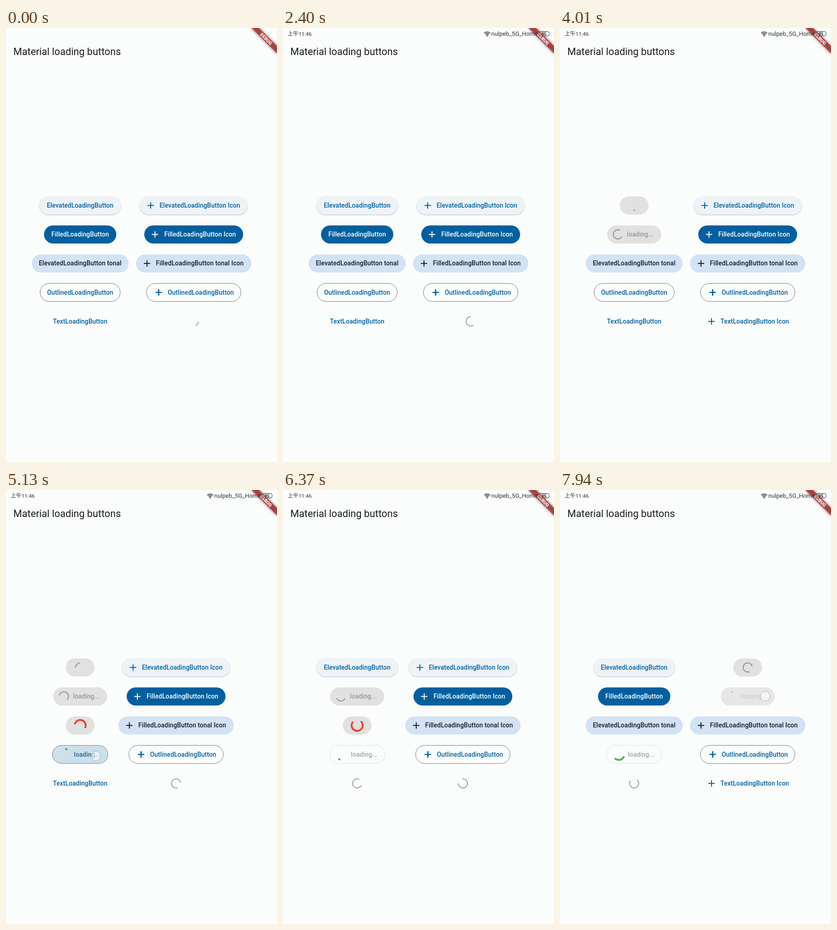
Recreate the animation shown at these times as an HTML page. Size 592x947 px, loop 7990 ms.

```html
<!DOCTYPE html>
<html lang="en">
<head>
<meta charset="utf-8">
<title>Material loading buttons</title>
<style>
  html, body { margin: 0; width: 100%; height: 100%; overflow: hidden; background: #fbfdfc; }
  svg { display: block; width: 592px; height: 947px; font-family: Roboto, sans-serif; }
  .label { font-size: 13.83px; font-weight: 500; letter-spacing: .1px; text-anchor: middle; }
  .raised { filter: drop-shadow(0 1px 1px rgba(0, 0, 0, .26)); }
</style>
</head>
<body>
<svg viewBox="0 0 592 947">
  <rect width="592" height="947" fill="#fbfdfc"/>
  <text x="16" y="59" font-size="21.72" fill="#1a1c1e">Material loading buttons</text>
  <g id="buttons"></g>
  <g transform="translate(592 0) rotate(45) scale(.9875)">
    <rect x="-40" y="28" width="80" height="12" fill="#000" opacity=".5" style="filter:blur(3px)"/>
    <rect x="-40" y="28" width="80" height="12" fill="#b71c1c" fill-opacity=".66"/>
    <text y="37.6" font-size="10.2" font-weight="900" fill="#fff" text-anchor="middle">DEBUG</text>
  </g>
  <g id="status" fill="#333">
    <text x="10" y="17.4" font-size="12" font-family="'Noto Sans CJK SC', 'Noto Sans CJK', sans-serif">上午<tspan
      font-family="Roboto, sans-serif" font-size="11.6">11:46</tspan></text>
    <g fill="none" stroke="#333" stroke-width="1.4">
      <path d="M439.3 11.2a9.5 9.5 0 0 1 13.4 0M441.4 13.4a6.5 6.5 0 0 1 9.2 0M443.6 15.5a3.4 3.4 0 0 1 4.8 0"/>
      <rect x="559.5" y="7.5" width="22" height="10" rx="4" stroke-width="1"/>
    </g>
    <circle cx="446" cy="17.2" r="1.2"/>
    <text x="455" y="17.2" font-size="13">nulpeb_5G_Home</text>
    <text x="570.3" y="15.8" font-size="9" font-weight="700" text-anchor="middle">95</text>
  </g>
  <g id="pointers"></g>
</svg>
<script>
const LOOP = 7990, LOAD = 3000, FADE = 200, HEIGHT = 39.5;
const BLUE = [0, 97, 160, 1], WHITE = [255, 255, 255, 1], INK = [16, 28, 43, 1];
const BORDER = [115, 119, 127, 1], OFF = [26, 28, 30, .38], FAINT = [26, 28, 30, .12];

const STYLES = {
  elevated: { fill: '#eef3f8', fg: BLUE },
  filled: { fill: '#00609f', fg: WHITE },
  tonal: { fill: '#d3e2f5', fg: INK },
  outlined: { fill: 'none', fg: BLUE, border: true },
  text: { fill: 'none', fg: BLUE, bare: true }
};

const THIN = { r: 10, stroke: 2, color: 'rgba(26,28,30,.42)' };
const small = { w: 63, spin: { ...THIN, dx: 0 } };
const filledBusy = { w: 118, textDx: 13.5, spin: { ...THIN, dx: -35.5 } };

// Each tap: time loading starts, pointer position, pointer lead time
const left = [
  { style: 'elevated', y: 387.2, w: 178, label: 'ElevatedLoadingButton', busy: small, taps: [[2825, 171, 384, 295]] },
  { style: 'filled', y: 450.4, w: 158, label: 'FilledLoadingButton', busy: filledBusy, taps: [[3485, 194, 453, 140]] },
  { style: 'tonal', y: 513.7, w: 212, label: 'ElevatedLoadingButton tonal',
    busy: { w: 63, spin: { r: 12, stroke: 4, color: '#ea4335', dx: 0 } }, taps: [[4270, 200, 517, 140]] },
  { style: 'outlined', y: 577, w: 176, label: 'OutlinedLoadingButton',
    busy: { w: 122, textDx: 15.5, spin: { r: 12, stroke: 4, color: '#4caf50', dx: -33.5 } }, taps: [[5075, 196.5, 580.5, 140]] },
  { style: 'text', y: 640.2, w: 135, label: 'TextLoadingButton', busy: small, taps: [[5850, 186, 643, 140]] }
];
const right = [
  { style: 'elevated', y: 387.2, w: 236, label: 'ElevatedLoadingButton Icon', textDx: 13.5, plus: -94, busy: small, taps: [[7240, 437, 394, 140]] },
  { style: 'filled', y: 450.4, w: 216, label: 'FilledLoadingButton Icon', textDx: 14, plus: -84.5, busy: filledBusy, taps: [[7895, 448, 450, 140]] },
  { style: 'tonal', y: 513.7, w: 252, label: 'FilledLoadingButton tonal Icon', textDx: 13.5, plus: -102, busy: small, taps: [] },
  { style: 'outlined', y: 577, w: 207.5, label: 'OutlinedLoadingButton', textDx: 15.5, plus: -76.5, bold: true, busy: small, taps: [] },
  { style: 'text', y: 640.2, w: 190, label: 'TextLoadingButton Icon', textDx: 15.5, plus: -79, busy: small,
    taps: [[-596, 420, 637, 0], [4424, 420, 637, 80]] }
];

const clamp = v => Math.min(1, Math.max(0, v));
const rgba = c => `rgba(${c.join()})`;
const mix = (a, b, p) => rgba(a.map((v, i) => +(v + (b[i] - v) * p).toFixed(i < 3 ? 0 : 3)));
const byId = id => document.getElementById(id);

// Cubic bezier (.4, 0, .2, 1)
function ease(x) {
  if (x <= 0 || x >= 1) return clamp(x);
  let lo = 0, hi = 1;
  for (let i = 0; i < 20; i++) {
    const p = (lo + hi) / 2, q = 1 - p;
    if (1.2 * q * q * p + .6 * q * p * p + p ** 3 < x) lo = p; else hi = p;
  }
  return lo * lo * (3 - 2 * lo);
}

function spinner(x, y, s, age) {
  const u = age / 1333 % 1, turn = age / 2222 % 1;
  const head = ease(u * 2), tail = ease(u * 2 - 1);
  const from = 270 * tail + 360 * turn + 90 * u;
  const sweep = Math.max(270 * (head - tail), .5);
  const at = deg => {
    const a = deg * Math.PI / 180;
    return `${(x + s.r * Math.sin(a)).toFixed(3)} ${(y - s.r * Math.cos(a)).toFixed(3)}`;
  };
  return `<path d="M${at(from)}A${s.r} ${s.r} 0 ${+(sweep > 180)} 1 ${at(from + sweep)}" fill="none"
    stroke="${s.color}" stroke-width="${s.stroke}" stroke-linecap="square"/>`;
}

const pill = (x, y, w, attrs) =>
  `<rect x="${x - w / 2}" y="${y - HEIGHT / 2}" width="${w}" height="${HEIGHT}" rx="${HEIGHT / 2}" ${attrs}/>`;

function ripple(b, x, w, t, id) {
  const tap = b.taps.find(([s]) => t > s - 130 && t < s + 270);
  if (!tap) return '';
  const [s, px, py] = tap, age = t - s + 130;
  const color = rgba(STYLES[b.style].fg);
  const fade = 1 - clamp((t - s - 70) / 200);
  const move = clamp(age / 250);
  const stop = (at, o) => `<stop offset="${at}" stop-color="${color}" stop-opacity="${o}"/>`;
  return `<radialGradient id="${id}" gradientUnits="userSpaceOnUse" cx="${px + (x - px) * move}"
      cy="${py + (b.y - py) * move}" r="${20 + age * .75}">${stop(0, .12)}${stop(.5, .11)}${stop(1, 0)}</radialGradient>
    <g opacity="${fade}">${pill(x, b.y, w, `fill="${color}" fill-opacity="${.08 * clamp(age / 80)}"`)}
    ${pill(x, b.y, w, `fill="url(#${id})"`)}</g>`;
}

const loadStart = (b, t) => b.taps.map(p => p[0]).find(s => t >= s && t < s + LOAD);
const widthAt = (b, t) => loadStart(b, t) === undefined ? b.w : b.busy.w;

function button(b, x, t, id) {
  const style = STYLES[b.style], start = loadStart(b, t), busy = start !== undefined;
  const w = widthAt(b, t), view = busy ? b.busy : b;

  // How far the colours have moved towards the disabled look
  const last = b.taps.map(p => p[0]).filter(s => s <= t).pop();
  let off = 0;
  if (busy) off = clamp((t - start) / FADE);
  else if (last !== undefined) off = 1 - clamp((t - last - LOAD) / FADE);
  const fg = mix(style.fg, OFF, off);

  let out = '';
  if (style.border) {
    out += ripple(b, x, w, t, id);
    out += pill(x, b.y, w - 1, `fill="none" stroke="${mix(BORDER, FAINT, off)}"`);
  } else {
    const raised = b.style === 'elevated' && !busy ? 'class="raised"' : '';
    if (!style.bare) out += pill(x, b.y, w, `fill="${busy ? rgba(FAINT) : style.fill}" ${raised}`);
    out += ripple(b, x, w, t, id);
  }
  if (busy) out += spinner(x + view.spin.dx, b.y, view.spin, t - start);
  else if (b.plus) out += `<path d="M${x + b.plus - 7} ${b.y}h14m-7 -7v14" stroke="${fg}" stroke-width="${b.bold ? 2.7 : 2}"/>`;
  const label = !busy ? b.label : view.textDx ? 'loading...' : '';
  if (label) out += `<text class="label" x="${x + (view.textDx || 0)}" y="${b.y + 4.7}" fill="${fg}">${label}</text>`;
  return out;
}

function pointer([s, x, y, lead], t) {
  if (t < s - lead || t > s + 90) return '';
  return `<circle cx="${x}" cy="${y}" r="10.5" fill="#fff" fill-opacity=".55" stroke="#5a6878" stroke-opacity=".4"/>`;
}

function draw(t) {
  byId('status').setAttribute('visibility', t < 460 ? 'hidden' : 'visible');
  t = Math.max(t, 435);
  // The right column follows the widest button on the left
  const rightX = 304 + Math.max(...left.map(b => widthAt(b, t))) / 2;
  byId('buttons').innerHTML =
    left.map((b, i) => button(b, 162, t, 'l' + i)).join('') +
    right.map((b, i) => button(b, rightX, t, 'r' + i)).join('');
  byId('pointers').innerHTML = [...left, ...right].flatMap(b => b.taps).map(p => pointer(p, t)).join('');
}

const begin = performance.now();
function tick() {
  draw((performance.now() - begin) % LOOP);
  requestAnimationFrame(tick);
}
tick();
</script>
</body>
</html>
```
